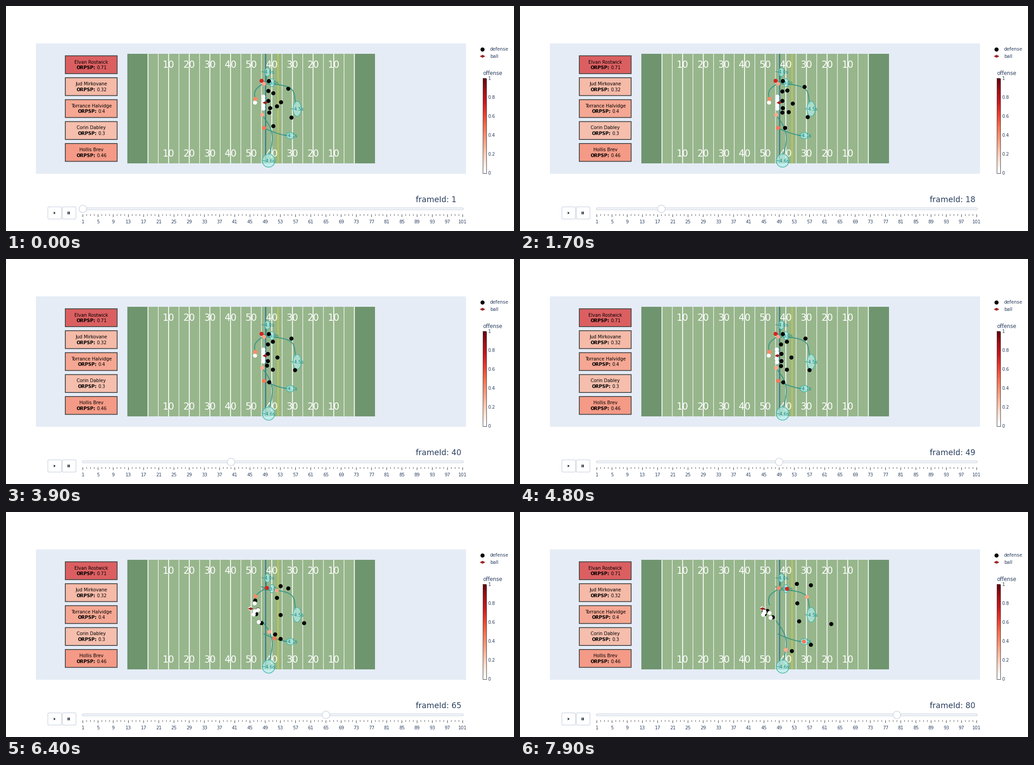
A matplotlib script that plays this animation: 1122 by 499 pixels, repeating every 8000 ms.

```python
import numpy as np
import matplotlib.pyplot as plt
from matplotlib.animation import FuncAnimation
from matplotlib.colors import LinearSegmentedColormap
from matplotlib.patches import Circle, Ellipse, FancyBboxPatch, Polygon, Rectangle

W, H, DPI = 1122, 499, 64
FRAMES, INTERVAL = 80, 100
SET, SNAP = 39, 47
INK, BORDER, TEAL = "#2a3f5f", "#bec8d9", "#108888"
TOP, BOTTOM, LEFT, YARD = 106, 349, 268, 547 / 120

REDS = LinearSegmentedColormap.from_list("heat", [
    "#ffffff", "#fee0d2", "#fcbba1", "#fc9272", "#fb6a4a",
    "#ef3b2c", "#cb181d", "#a50f15", "#67000d"])

CARDS = [("Elvan Rostwick", 0.71), ("Jud Mirkovane", 0.32),
         ("Torrance Halvidge", 0.4), ("Corin Dabley", 0.3),
         ("Hollis Brev", 0.46)]

# Top speed of each receiver and the Bezier control points of the route.
ROUTES = [
    (1.2, [(564.5, 166), (572, 168), (580, 169), (590, 170.5)]),
    (2.8, [(570, 172.5), (648, 174), (634, 192), (640, 218)]),
    (1.95, [(551, 206), (539, 172), (585, 180), (573.5, 150)]),
    (2.9, [(566, 241.5), (581, 265), (598, 277), (581, 332)]),
    (2.55, [(570, 270.5), (586, 278), (606, 287), (627, 287.5)]),
]
# Centre, radii and label of each arrival zone.
ZONES = [(577.5, 146.5, 6, 9.5, "~4.0s"), (587.5, 170, 5.5, 9, "~3.0s"),
         (643, 228, 9, 16.5, "~4.5s"), (628.5, 287.5, 9.5, 7, "~4.1s"),
         (580, 343, 14, 14.5, "~4.6s")]

# Each defender: first position, position at the snap, last position.
COVER = [
    [(580, 166), (580, 166), (642, 162)],
    [(623.5, 183), (630.5, 176), (611.5, 159)],
    [(590.5, 192.5), (589, 182.5), (612, 201.5)],
    [(607, 213), (599, 218), (616.5, 242)],
    [(598.5, 221.5), (589, 245), (600, 308)],
    [(630.5, 246.5), (638.5, 245.5), (687, 247.5)],
    [(590, 265.5), (581, 272.5), (642.5, 294)],
]
RUSH = [
    [(579.5, 188), (578, 189), (537, 217)],
    [(579.5, 210), (578.5, 210), (546, 219)],
    [(583, 225.5), (578.5, 225.5), (540, 226)],
    [(581.5, 235.5), (576.5, 236), (558, 233)],
]
POCKET = [(540, 221), (551, 224), (540, 223), (537, 228), (553.5, 234.5)]


def px(size):
    return size * 72 / DPI


def ease_out(u):
    return 1 - (1 - np.clip(u, 0, 1)) ** 1.5


def bezier(points, n=200):
    u = np.linspace(0, 1, n)[:, None]
    a, b, c, d = np.array(points, float)
    return (1 - u) ** 3 * a + 3 * u * (1 - u) ** 2 * b + 3 * u * u * (1 - u) * c + u ** 3 * d


# Time since the snap; runners gather speed, blockers and rushers lose it.
time = np.arange(FRAMES)
live = np.maximum(time - SNAP, 0)
run = live - 8 * (1 - np.exp(-live / 8))
phase = live / live[-1]
clash = ease_out(phase)


def move(players, share):
    """Drift to the set position, then cover the given share of the way on."""
    first, ready, last = np.array(players, float).swapaxes(0, 1)
    drift = ease_out(time / SET)[:, None, None]
    return first + (ready - first) * drift + (last - ready) * share[:, None, None]


def spread(players):
    """Players on the edge swing wide around the pocket."""
    path = move(players, clash)
    swing = 1.5 * np.linspace(-2, 2, len(players)) ** 3
    path[:, :, 1] += np.sin(np.pi * phase)[:, None] * swing
    return path


def follow(speed, points):
    """Run along a route by distance covered."""
    path = bezier(points)
    steps = np.hypot(*np.diff(path, axis=0).T)
    length = np.concatenate([[0], np.cumsum(steps)])
    return np.stack([np.interp(speed * run, length, axis) for axis in path.T], axis=1)


fig = plt.figure(figsize=(W / DPI, H / DPI), dpi=DPI, facecolor="white")
plt.rcParams["font.family"] = "DejaVu Sans"
ax = fig.add_axes([0, 0, 1, 1])
ax.axis("off")


def label(x, y, text, size=10, color=INK, ha="center", z=3, **kw):
    return ax.text(x, y + 0.36 * size, text, fontsize=px(size), color=color,
                   ha=ha, va="baseline", zorder=z, **kw)


def box(x0, y0, x1, y1, fill, edge="none", lw=0, z=1, **kw):
    ax.add_patch(Rectangle((x0, y0), x1 - x0, y1 - y0, facecolor=fill,
                           edgecolor=edge, linewidth=px(lw), zorder=z, **kw))


def rounded(x0, y0, x1, y1, r, fill):
    ax.add_patch(FancyBboxPatch(
        (x0, y0), x1 - x0, y1 - y0, boxstyle=f"round,pad=0,rounding_size={r}",
        facecolor=fill, edgecolor=BORDER, linewidth=px(1), zorder=2))


def vline(x, y0, y1, color, lw, z=2):
    ax.plot([x, x], [y0, y1], color=color, lw=px(lw), zorder=z,
            solid_capstyle="butt", snap=False)


def dots(points, color, z):
    return ax.scatter(points[:, 0], points[:, 1], s=px(9) ** 2, c=color,
                      linewidths=0, zorder=z)


def diamond(x, y, z):
    return ax.scatter([x], [y], s=px(12) ** 2, c="#9c2525", linewidths=0,
                      zorder=z, marker=[(-1, 0), (0, 0.55), (1, 0), (0, -0.55)])


def draw_cards():
    for i, (name, value) in enumerate(CARDS):
        y = 130.2 + 48.65 * i
        box(131, y - 19.8, 245.5, y + 19.8, REDS(value), alpha=0.7, snap=False)
        box(131, y - 19.8, 245.5, y + 19.8, "none", "#444444", 1.8, z=2, snap=False)
        label(188.5, y - 6.3, name, 10, "black")
        split = 197.5 + 3.2 * (4 - len(str(value)))
        label(split, y + 6.3, "ORPSP:", 10, "black", "right", weight="bold")
        label(split + 2.8, y + 6.3, str(value), 10, "black", "left")


def draw_field():
    right = LEFT + 120 * YARD
    box(66, 83, 1016.5, 371.5, "#e5ecf6", z=0)
    box(LEFT, TOP, right, BOTTOM, "#97b68c")
    for x in (LEFT, right - 10 * YARD):
        box(x, TOP, x + 10 * YARD, BOTTOM, "#6f956f")
    for yard in range(10, 111, 5):
        vline(LEFT + yard * YARD, TOP, BOTTOM, "white", 1.2 if yard % 10 else 1.9)
    for yard in range(20, 101, 10):
        for y in (129.3, 326.7):
            label(LEFT + yard * YARD, y, str(min(yard, 120 - yard) - 10), 20.5, "white")
    vline(573.5, TOP, BOTTOM, "#1a6c93", 1.9, z=3)
    vline(600.8, TOP, BOTTOM, "#d9cb26", 1.9, z=3)


def draw_routes():
    for _, points in ROUTES:
        ax.plot(*bezier(points).T, color="#2f9485", alpha=0.85, lw=px(2.2), zorder=4)
    for x, y, rx, ry, text in ZONES:
        ax.add_patch(Ellipse((x, y), 2 * rx, 2 * ry, facecolor=(0.71, 0.94, 0.92, 0.68),
                             edgecolor="#45b5a8", linewidth=px(1.4), zorder=5))
        label(x, y, text, 10, TEAL, z=6)


def draw_legend():
    dots(np.array([[1052, 95.5]]), "black", 3)
    diamond(1052, 111, 3)
    label(1068.7, 95.5, "defense", 10.2, ha="left")
    label(1068.7, 111, "ball", 10.2, ha="left")
    label(1053, 149, "offense", 11.6, ha="left")
    ax.imshow(np.linspace(1, 0, 64)[:, None], cmap=REDS, aspect="auto",
              extent=(1053, 1061, 370.5, 160.5), zorder=1)
    box(1053, 160.5, 1061, 370.5, "none", "#444444", 1, z=2)
    for i in range(6):
        label(1064.8, 370.5 - 42 * i, f"{i / 5:g}", 10, ha="left")


def slider_x(frame):
    return 169.7 + 8.39 * frame


def draw_controls():
    rounded(92.5, 445.5, 122.5, 472.5, 2, "white")
    rounded(124.5, 445.5, 154.5, 472.5, 2, "white")
    ax.add_patch(Polygon([(105.5, 456), (105.5, 462), (109.5, 459)],
                         facecolor="#1c2a40", zorder=3))
    for x in (136.3, 139.3):
        box(x, 456, x + 1.6, 462, "#1c2a40", z=3)
    rounded(168.5, 447.8, 1010, 452, 2, "#f8fafc")
    for i in range(101):
        major = i % 4 == 0
        vline(slider_x(i), 462, 468 if major else 465, "#333333", 1)
        if major:
            label(slider_x(i), 478, str(i + 1), 10)


draw_cards()
draw_field()
draw_routes()
draw_legend()
draw_controls()

stance = np.linspace((568.5, 201), (568.5, 227.5), 5)
blockers = spread(list(zip(stance, stance, POCKET)))
passer = np.stack([550 - 15 * clash, np.full(FRAMES, 214.2)], axis=1)
receivers = np.stack([follow(*route) for route in ROUTES], axis=1)
offense = np.concatenate([passer[:, None], blockers, receivers], axis=1)
defense = np.concatenate([spread(RUSH), move(COVER, run / run[-1])], axis=1)
in_hand = np.clip(live / 6, 0, 1)[:, None]
ball = (572.3, 214.4) * (1 - in_hand) + passer * in_hand

shades = ["white"] * 6 + [REDS(value) for _, value in CARDS]
defense_dots = dots(defense[0], "black", 7)
offense_dots = dots(offense[0], shades, 8)
ball_mark = diamond(*ball[0], 9)
handle = ax.add_patch(Circle((slider_x(0), 450), 8.3, facecolor="white",
                             edgecolor=BORDER, linewidth=px(1), zorder=4))
counter = label(905, 429, "", 17.3, ha="left")

ax.set_xlim(0, W)
ax.set_ylim(H, 0)


def update(frame):
    defense_dots.set_offsets(defense[frame])
    offense_dots.set_offsets(offense[frame])
    ball_mark.set_offsets(ball[frame:frame + 1])
    handle.center = slider_x(frame), 450
    counter.set_text(f"frameId: {frame + 1}")
    return defense_dots, offense_dots, ball_mark, handle, counter


anim = FuncAnimation(fig, update, frames=FRAMES, interval=INTERVAL,
                     repeat=True, repeat_delay=0)
plt.show()
```
